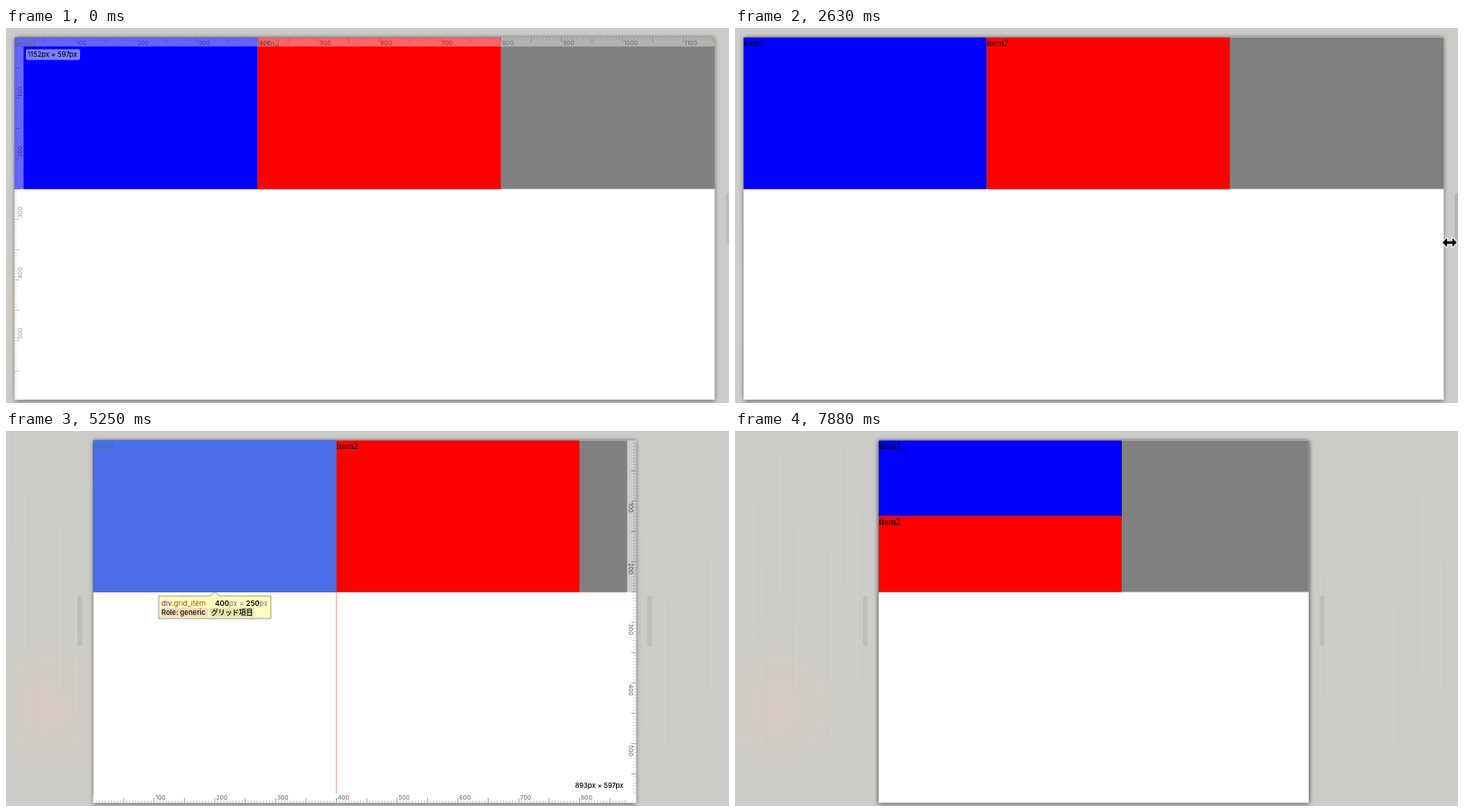
An HTML page with a canvas that plays this animation: 800x416 px, repeating every 8 s.

```html
<!DOCTYPE html>
<html lang="ja">
<head>
<meta charset="utf-8">
<style>
  html, body { margin: 0; width: 100%; height: 100%; overflow: hidden; background: #cccdc9; }
  canvas { display: block; }
</style>
</head>
<body>
<canvas id="stage" width="800" height="416"></canvas>
<script>
const ctx = document.getElementById('stage').getContext('2d');
const LOOP = 8000, STEP = 125;
const SCALE = 0.6725;              // screen pixels per CSS pixel of the page
const TOP = 10.5, BOTTOM = 412.5, CENTER = 396.9;
const ITEM = 400 * SCALE, GRID = 250 * SCALE, RULER = 10;
const UI = 'Inter, "Noto Sans CJK JP", sans-serif';

// Left edge of the page; the right edge mirrors it around CENTER.
const EDGE = [[2630, 9.5], [2750, 16], [3380, 82], [3750, 96.5], [6500, 96.5],
  [6750, 100.5], [7380, 155], [7625, 159]];

function track(points, t) {
  if (t <= points[0][0]) return points[0][1];
  for (let i = 1; i < points.length; i++) {
    const [t0, a] = points[i - 1], [t1, b] = points[i];
    if (t <= t1) return a + (b - a) * (t - t0) / (t1 - t0);
  }
  return points[points.length - 1][1];
}

function box(x, y, w, h, color) {
  ctx.fillStyle = color;
  ctx.fillRect(x, y, w, h);
}

function roundBox(x, y, w, h, r, color) {
  ctx.fillStyle = color;
  ctx.beginPath();
  ctx.roundRect(x, y, w, h, r);
  ctx.fill();
}

function text(str, x, y, font, color, align = 'left') {
  ctx.font = font;
  ctx.fillStyle = color;
  ctx.textAlign = align;
  ctx.fillText(str, x, y);
  return x + ctx.measureText(str).width;
}

function line(x1, y1, x2, y2, color, width = 0.8) {
  ctx.strokeStyle = color;
  ctx.lineWidth = width;
  ctx.beginPath();
  ctx.moveTo(x1, y1);
  ctx.lineTo(x2, y2);
  ctx.stroke();
}

function backdrop() {
  box(0, 0, 800, 416, '#cccdc9');
  const glow = ctx.createRadialGradient(45, 305, 5, 45, 305, 95);
  glow.addColorStop(0, 'rgba(222,202,192,.55)');
  glow.addColorStop(1, 'rgba(222,202,192,0)');
  box(0, 200, 150, 216, glow);
  for (let i = 0; i < 16; i++) {
    const x = i < 10 ? 6 + i * 14.3 : 650 + (i - 10) * 26;
    const y = (i * 73) % 190;
    box(x, y, 1, 130 + (i * 37) % 90, i % 2 ? 'rgba(255,255,255,.13)' : 'rgba(0,0,0,.018)');
  }
}

function page(left, right) {
  ctx.save();
  ctx.shadowColor = 'rgba(0,0,0,.75)';
  ctx.shadowBlur = 5;
  ctx.shadowOffsetY = 0.5;
  box(left, TOP, right - left, BOTTOM - TOP, '#fff');
  ctx.restore();

  box(left, TOP, right - left, GRID, '#808080');
  const stacked = right - left < 2 * ITEM;
  const height = stacked ? GRID / 2 : GRID;
  ['#00f', '#f00'].forEach((color, i) => {
    const x = left + (stacked ? 0 : i * ITEM), y = TOP + (stacked ? i * height : 0);
    box(x, y, ITEM, height, color);
    text('item' + (i + 1), x, y + 9.7, '10.76px "Liberation Serif", serif', '#000');
  });
}

// Ticks run along local x (dir) and grow along local y (side).
function ruler(x, y, angle, length, dir, side) {
  ctx.save();
  ctx.translate(x, y);
  ctx.rotate(angle);
  for (let i = 5; i * SCALE < length; i += 5) {
    const at = dir * i * SCALE, major = i % 50 === 0;
    line(at, 0, at, side * (major ? 5.4 : 3.2), major ? 'rgba(0,0,0,.5)' : 'rgba(0,0,0,.26)', 0.7);
    if (i % 100 === 0)
      text(i, at + 1.4, side > 0 ? 8.7 : -4, '6.8px ' + UI, 'rgba(0,0,0,.6)');
  }
  ctx.restore();
}

function rulers(left, right, far) {
  const width = right - left, height = BOTTOM - TOP, white = 'rgba(255,255,255,.6)';
  const size = `${Math.round(width / SCALE)}px × 597px`, font = '500 7.5px ' + UI;
  if (far) {
    box(left, BOTTOM - RULER, width, RULER, white);
    box(right - RULER, TOP, RULER, height - RULER, white);
    ruler(left, BOTTOM, 0, width - RULER, 1, -1);
    ruler(right, TOP, Math.PI / 2, height - RULER, 1, 1);
    text(size, right - 14.2, 396.2, font, '#000', 'right');
  } else {
    ctx.globalAlpha = 0.66;
    box(left, TOP, width, RULER, white);
    box(left, TOP + RULER, RULER, height - RULER, white);
    ruler(left, TOP, 0, width, 1, 1);
    ruler(left, TOP, -Math.PI / 2, height, -1, 1);
    roundBox(left + 12.5, 23.5, 60, 12, 2, 'rgba(255,255,255,.75)');
    ctx.globalAlpha = 1;
    text(size, left + 14.5, 32.2, font, '#0a0a30');
  }
}

function tooltip(cx) {
  const x = cx - 62, y = 183;
  ctx.beginPath();
  ctx.moveTo(x, y);
  ctx.lineTo(cx - 5, y);
  ctx.lineTo(cx, y - 4.5);
  ctx.lineTo(cx + 5, y);
  ctx.lineTo(x + 124, y);
  ctx.lineTo(x + 124, y + 25);
  ctx.lineTo(x, y + 25);
  ctx.closePath();
  ctx.fillStyle = '#ffffc2';
  ctx.fill();
  ctx.strokeStyle = 'rgba(90,90,80,.65)';
  ctx.lineWidth = 0.9;
  ctx.stroke();

  const plain = '8.1px ' + UI, bold = '600 7.9px ' + UI;
  const end = text('div', x + 3, 193.6, plain, '#881280');
  text('.grid_item', end, 193.6, plain, '#a0560a');
  let at = x + 62.3;
  [['400', bold, '#000'], ['px × ', '7.9px ' + UI, '#777'], ['250', bold, '#000'], ['px', '7.9px ' + UI, '#777']]
    .forEach(([str, font, color]) => { at = text(str, at, 193.6, font, color); });

  box(x + 2.5, 196.3, 52, 9.6, 'rgba(240,190,170,.6)');
  box(x + 57, 196.3, 48, 9.6, 'rgba(205,205,150,.6)');
  text('Role: generic', x + 3, 203.8, '600 7.7px ' + UI, '#222');
  text('グリッド項目', x + 58, 203.8, '600 7.7px "Noto Sans CJK JP", sans-serif', '#222');
}

function inspect(left, right) {
  const guide = 'rgba(255,0,0,.42)', floor = TOP + GRID;
  box(left, TOP, ITEM, GRID, 'rgba(111,168,220,.66)');
  rulers(left, right, true);
  line(left + ITEM, floor, left + ITEM, BOTTOM - RULER, guide);
  line(left + 0.3, floor, left + 0.3, BOTTOM - RULER, 'rgba(255,0,0,.25)');
  line(left + ITEM, floor, right - RULER, floor, guide);
  tooltip(left + ITEM / 2);
}

function cursor(x, y) {
  ctx.beginPath();
  [[-8, 0], [-3, -5], [-3, -1.5], [3, -1.5], [3, -5], [8, 0], [3, 5], [3, 1.5], [-3, 1.5], [-3, 5]]
    .forEach(([dx, dy]) => ctx.lineTo(x + dx, y + dy));
  ctx.closePath();
  ctx.lineJoin = 'round';
  ctx.strokeStyle = '#fff';
  ctx.lineWidth = 2;
  ctx.stroke();
  ctx.fillStyle = '#000';
  ctx.fill();
}

function draw(now) {
  const t = Math.floor((now % LOOP + 5) / STEP) * STEP + 5;
  const left = track(EDGE, t), right = 2 * CENTER - left;
  const firstDrag = t > 1875 && t < 3850, secondDrag = t > 6250 && t < 7700;

  backdrop();
  const grip = firstDrag || secondDrag ? 'rgba(0,0,0,.11)' : 'rgba(0,0,0,.065)';
  for (const x of [left - 14.8, right + 14.8]) roundBox(x - 2.7, 183, 5.4, 56, 2.7, grip);
  page(left, right);

  if (t < 130) rulers(left, right, false);
  else if (t < 1250 || t > 4000 && t < 5875) inspect(left, right);

  if (firstDrag)
    cursor(right + track([[1880, -4], [2250, 6.5]], t), track([[1880, 247], [2250, 238]], t));
  if (secondDrag) cursor(right + 4, 201);
}

const start = performance.now();
function tick() {
  draw(performance.now() - start);
  requestAnimationFrame(tick);
}
tick();
</script>
</body>
</html>
```
